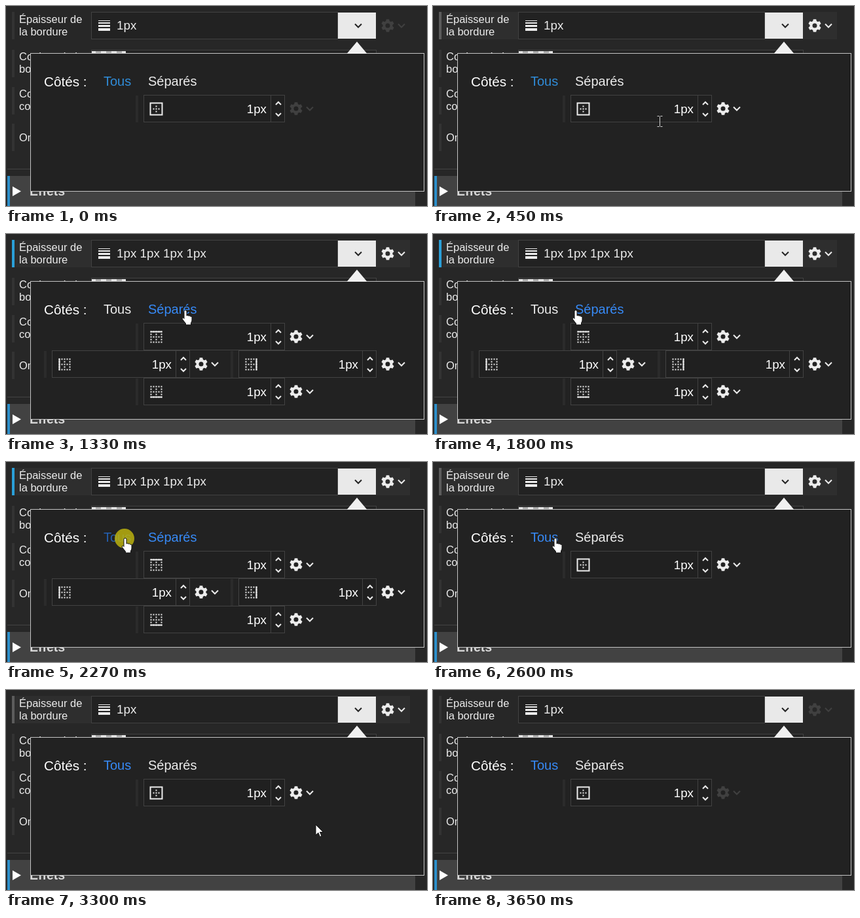
Recreate the animation shown at these times as an HTML page with a canvas. Size 643 by 306 pixels, loop 4.26 s.

```html
<!DOCTYPE html>
<html lang="fr">
<head>
<meta charset="utf-8">
<title>Épaisseur de la bordure</title>
<style>
html, body { margin: 0; width: 100%; height: 100%; overflow: hidden; background: #272727; }
canvas { display: block; }
</style>
</head>
<body>
<canvas id="stage" width="643" height="306"></canvas>
<script>
const ctx = document.getElementById('stage').getContext('2d');
const LOOP = 4260, WHITE = '#ececec', LINE = '#424242';
const PRESS_SPLIT = 1180, SPLIT = 1330, PRESS_ALL = 2270, ALL = 2400;
const ENTER = 170, LEAVE = 3650;

const linear = u => u;
const smooth = u => u * u * (3 - 2 * u);
const settle = u => 1 - (1 - u) ** 1.85;

// start, step length, steps, x0, y0, x1, y1, easing
const moves = [
  [170, 70, 9, 484, 284, 276, 121, settle],
  [910, 70, 1, 276, 121, 274, 117, linear],
  [1522, 68, 7, 274, 117, 182, 117, smooth],
  [2332, 68, 6, 182, 117, 203, 116, u => u * u],
  [2740, 70, 3, 203, 116, 314, 121, linear],
  [2950, 70, 5, 314, 121, 473, 206, linear],
  [3300, 70, 4, 473, 206, 585, 292, linear]
];

const HAND = new Path2D('M-2 1.5Q-2-.5 0-.5T2 1.5V8Q3.5 7 5 8.2Q6.5 7.4 7.5 9Q10 8.8 10 10.5V15Q10 17 8.5 19V22H.5V20L-4.5 13.5Q-5.5 11-3.5 11L-2 12.5Z');
const ARROW = new Path2D('M0 0V16L4 12.5L6.5 18.5L9 17.5L6.5 11.5H11.5Z');
const BEAM = new Path2D('M-4-7.5H-1L0-6.5L1-7.5H4M0-6.5V7.5M-4 8.5H-1L0 7.5L1 8.5H4');

function rect(x, y, w, h, fill) {
  ctx.fillStyle = fill;
  ctx.fillRect(x, y, w, h);
}

function box(x, y, w, h, fill, stroke = LINE) {
  rect(x, y, w, h, fill);
  ctx.strokeStyle = stroke;
  ctx.lineWidth = 1;
  ctx.strokeRect(x + .5, y + .5, w - 1, h - 1);
}

function text(s, x, y, size, fill = WHITE, align = 'left', weight = '') {
  ctx.font = `${weight} ${size}px "Liberation Sans", Arial, sans-serif`;
  ctx.textAlign = align;
  ctx.fillStyle = fill;
  ctx.fillText(s, x, y);
}

function poly(fill, ...pts) {
  ctx.beginPath();
  for (let i = 0; i < pts.length; i += 2) ctx.lineTo(pts[i], pts[i + 1]);
  ctx.fillStyle = fill;
  ctx.fill();
}

function chevron(x, y, color, w = 5, h = 2.5) {
  ctx.beginPath();
  ctx.moveTo(x - w, y - h);
  ctx.lineTo(x, y + h);
  ctx.lineTo(x + w, y - h);
  ctx.strokeStyle = color;
  ctx.lineWidth = 2;
  ctx.stroke();
}

function gear(x, y, color) {
  ctx.save();
  ctx.translate(x, y);
  ctx.beginPath();
  ctx.arc(0, 0, 5.5, 0, 7);
  ctx.strokeStyle = color;
  ctx.lineWidth = 4;
  ctx.stroke();
  for (let i = 0; i < 6; i++) {
    poly(color, -3, -6, -2.2, -9.8, 2.2, -9.8, 3, -6);
    ctx.rotate(Math.PI / 3);
  }
  ctx.restore();
  chevron(x + 21, y, color);
}

function sideIcon(cx, cy, side) {
  const x = cx - 9, y = cy - 9;
  if (side === 'all') {
    ctx.strokeStyle = WHITE;
    ctx.lineWidth = 2;
    ctx.strokeRect(x, y, 18, 18);
  }
  for (let i = 0; i < 5; i++) for (let j = 0; j < 5; j++) {
    const inner = i % 4 && j % 4;
    if (i % 2 && j % 2 || side === 'all' && !inner) continue;
    rect(x + i * 4, y + j * 4, 2, 2, WHITE);
  }
  if (side === 'top') rect(x, y, 18, 2, WHITE);
  if (side === 'bottom') rect(x, y + 16, 18, 2, WHITE);
  if (side === 'left') rect(x, y, 2, 18, WHITE);
  if (side === 'right') rect(x + 16, y, 2, 18, WHITE);
}

function field(x, y, w, side, gearColor) {
  const end = x + w, mid = y + 21;
  rect(x - 12, y + 1, 4, 41, '#2b2b2b');
  box(x, y, w, 42, '#202020');
  box(end - 1, y, 22, 42, '#202020');
  sideIcon(x + 19.5, mid + .5, side);
  text('1px', end - 7, mid + 7, 18.8, '#fff', 'right');
  chevron(end + 11, mid - 8, WHITE, 4, -2);
  chevron(end + 11, mid + 9, WHITE, 4, 2);
  gear(end + 38, mid, gearColor);
}

const grey = v => `rgb(${v},${v},${v})`;
const mix = (a, b, u) => grey(Math.round(a + (b - a) * u));

function page(split, lit, gearColor) {
  rect(0, 0, 643, 306, '#272727');

  rect(9, 9, 608, 42, mix(39, 46, lit));
  rect(9, 9, 4, 42, split ? '#2a9fd8' : mix(51, 92, lit));
  text('Épaisseur de', 20, 26, 16.5);
  text('la bordure', 20, 45, 16.5);
  box(130, 9, 377, 42, '#222');
  for (let i = 0; i < 4; i++) rect(141, [22, 25, 29, 34][i], 18, i + 1, WHITE);
  text(split ? '1px 1px 1px 1px' : '1px', 169, 36, 18.8);
  rect(507, 10, 58, 40, '#e9e9e9');
  chevron(538, 30, '#222');
  gear(583, 30, gearColor);

  for (const y of [67, 124, 180]) rect(9, y, 4, 42, '#333');
  text('Couleur de la', 20, 83, 16.5);
  text('bordure', 20, 102, 16.5);
  text('Couleur du', 20, 140, 16.5);
  text('contour', 20, 159, 16.5);
  text('Ombre', 20, 207, 16.5);
  box(130, 67, 436, 42, '#222');
  rect(131, 69, 52, 38, '#e4e4e4');
  for (let x = 137; x < 180; x += 16) rect(x, 69, 8, 8, '#aaa');

  rect(2, 249, 623, 1, '#444');
  rect(2, 260, 623, 46, '#424242');
  rect(2, 260, 4, 46, '#2d8fca');
  poly('#fff', 10, 276, 23, 283.5, 10, 291);
  text('Effets', 36, 290, 19.5, '#d8d8d8', 'left', 'bold');
}

function panel(t, split, gearColor) {
  box(37, 72, 602, 212, '#222', '#c4c4c4');
  poly('#f0f0f0', 536, 54.5, 551.5, 73, 520.5, 73);

  const blue = t < SPLIT ? '#308cd8' : '#378af6';
  const pressSplit = t >= PRESS_SPLIT && t < SPLIT;
  const pressAll = t >= PRESS_ALL && t < ALL;
  text('Côtés :', 58, 122.5, 20.7, '#fff');
  text('Tous', 149, 122, 20, pressAll ? '#245fb0' : split ? WHITE : blue);
  text('Séparés', 217, 122, 20, pressSplit ? '#245fb0' : split ? blue : WHITE);

  field(210, 136, 195, split ? 'top' : 'all', gearColor);
  if (split) {
    field(70, 178, 190, 'left', gearColor);
    field(355, 178, 190, 'right', gearColor);
    field(210, 220, 195, 'bottom', gearColor);
  }

  if (pressSplit || pressAll) {
    ctx.beginPath();
    ctx.arc(pressAll ? 181 : 274.5, pressAll ? 117 : 116, 15, 0, 7);
    ctx.fillStyle = 'rgba(190,180,14,.83)';
    ctx.fill();
  }
}

function cursor(t) {
  if (t < ENTER || t >= LEAVE) return;
  const [t0, dt, n, x0, y0, x1, y1, ease] = moves.filter(m => t >= m[0]).pop();
  const u = ease(Math.min(1, Math.floor((t - t0) / dt + 1e-6) / n));
  const x = Math.round(x0 + (x1 - x0) * u), y = Math.round(y0 + (y1 - y0) * u);
  const within = (l, top, r, b) => x >= l && x <= r && y >= top && y <= b;

  ctx.save();
  ctx.translate(x, y);
  ctx.lineWidth = 1;
  if (within(210, 136, 404, 178)) {
    ctx.translate(.5, 0);
    ctx.strokeStyle = '#d0d0d0';
    ctx.stroke(BEAM);
  } else {
    const shape = within(149, 100, 191, 132) || within(217, 100, 291, 132) ? HAND : ARROW;
    ctx.fillStyle = '#fff';
    ctx.strokeStyle = '#111';
    ctx.fill(shape);
    ctx.stroke(shape);
  }
  ctx.restore();
}

function draw(t) {
  const split = t >= SPLIT && t < ALL;
  const lit = Math.max(0, Math.min(1, (t - ENTER) / 140, (LEAVE - t) / 140));
  const gearColor = mix(64, 236, lit);
  page(split, lit, gearColor);
  panel(t, split, gearColor);
  cursor(t);
}

const start = performance.now();
function tick() {
  draw((performance.now() - start) % LOOP);
  requestAnimationFrame(tick);
}
tick();
</script>
</body>
</html>
```
